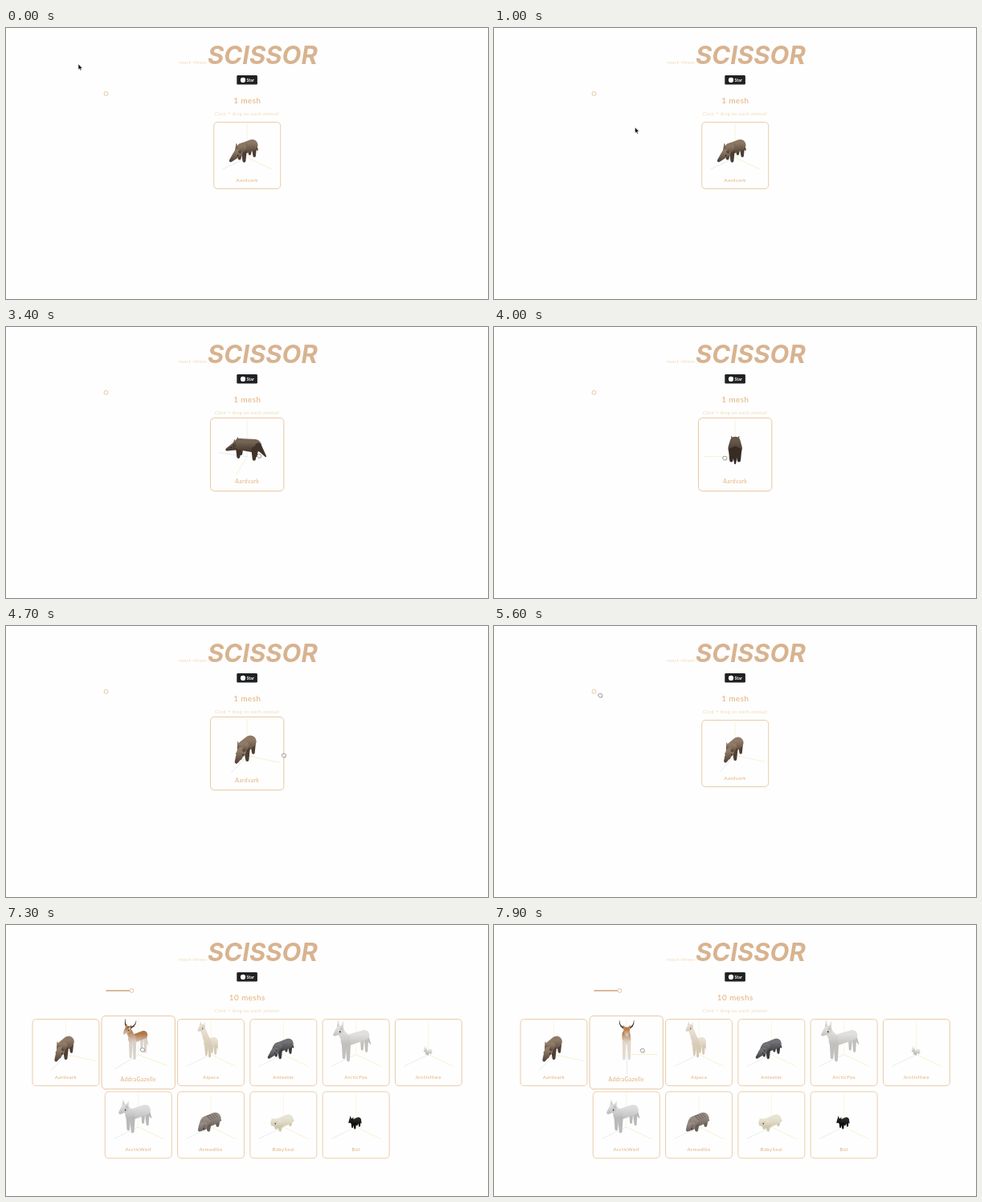
These frames come from a looping animation (600x338 px, 8000 ms). An HTML page:

```html
<!DOCTYPE html>
<html lang="en">
<head>
<meta charset="utf-8">
<title>Scissor</title>
<style>
html, body { margin: 0; height: 100%; overflow: hidden; background: #fefefe; }
svg { display: block; width: 100vw; height: 100vh; }
text { font-family: Lato, "Open Sans", sans-serif; fill: #e2b079; }
.mid { text-anchor: middle; }
.pale { fill: #f0dab6; }
.title { font: italic 700 31px Inter, sans-serif; fill: #d8b390; }
</style>
</head>
<body>
<svg viewBox="0 0 600 338">
  <defs id="defs"></defs>
  <text class="pale" x="215" y="45" font-size="6.4" letter-spacing=".25">react-three-</text>
  <text class="title" x="251" y="45">SCISSOR</text>
  <rect x="287.3" y="59" width="25.6" height="11.6" rx="1.4" fill="#1f2123"/>
  <circle cx="295" cy="64.9" r="3.1" fill="#fff"/>
  <text x="299.6" y="67" font-size="5.2" style="font-weight:700;fill:#fff">Star</text>
  <text id="count" class="mid" x="300.3" y="93.6" font-size="9.8" letter-spacing=".5"></text>
  <text class="mid pale" x="300.3" y="108.6" font-size="6" letter-spacing=".25">Click + drag on each animal!</text>
  <g id="scene"></g>
</svg>
<script>
const LOOP = 8000, RAD = Math.PI / 180;
const SIN = .48, COS = .88; // camera elevation
const SIDES = [-1, 1], STEPS = [0, 1, 2, 3];
const $ = id => document.getElementById(id);
const clamp = (v, lo, hi) => Math.min(hi, Math.max(lo, v));

// Points are [forward, side, up]; a part is a tapered capsule between two of them.
const part = (a, ra, b, rb, fill) => ({ a, ra, b, rb, fill });

// Every animal grows from its body length, height and girth, neck rise, nose and ear length.
function beast(name, light, dark, len, tall, girth, neck, nose, ear, extra = []) {
  const hr = girth * .65, hf = len + girth * .8 + neck * .2, hy = tall + neck;
  const parts = [
    part([-len, 0, tall], girth, [len, 0, tall], girth * .9),
    part([len, 0, tall + girth * .2], girth * .75, [hf, 0, hy], hr * .8),
    part([hf, 0, hy], hr, [hf + nose, 0, hy - nose * .55], hr * .35),
    part([-len - girth * .5, 0, tall], girth * .5, [-len * 1.5 - girth, 0, tall * .25], girth * .1, dark)
  ];
  for (const s of SIDES) {
    for (const f of [-len, len])
      parts.push(part([f, s * girth * .5, tall - girth * .4], girth * .42, [f, s * girth * .55, .5], girth * .24, dark));
    parts.push(part([hf, s * hr * .6, hy + hr * .5], hr * .4, [hf - 1, s * hr, hy + hr * .6 + ear], hr * .1));
    const eye = [hf + nose * .35, s * hr * .75, hy - nose * .1];
    parts.push(part(eye, hr * .16, eye, hr * .16, '#28221f'));
  }
  return { name, light, dark, parts: parts.concat(extra) };
}

const horn = (s, u) => [17 - 4 * u, s * (1 + 6.5 * Math.sin(u * Math.PI / 2)), 39 + 8 * u * u];
const horns = SIDES.flatMap(s => STEPS.map(k =>
  part(horn(s, k / 4), 1 - k / 5, horn(s, (k + 1) / 4), .8 - k / 5, '#4a3c34')));
const bands = SIDES.flatMap(s => STEPS.map(k =>
  part([k * 4 - 6, s * 5.5, 14], .35, [k * 4 - 6, 0, 17.4], .35, '#6b625c')));

const herd = [
  beast('Aardvark', '#917c68', '#4f3f34', 9, 15, 7.4, -3, 11, 7),
  beast('AddraGazelle', '#b67c49', '#e0d8d0', 10, 23, 5, 14, 6, 3, horns),
  beast('Alpaca', '#f3eadb', '#e0d2bd', 5, 17, 5.6, 24, 5, 4),
  beast('Anteater', '#77777a', '#3f3f43', 9, 13, 6.5, -3, 9, 2),
  beast('ArcticFox', '#ebeae8', '#cbc9c6', 16, 24, 7, 16, 7, 8),
  beast('ArcticHare', '#ececea', '#c4c2c0', 2.5, 4, 2.6, 4, 2, 4),
  beast('ArcticWolf', '#e6e6e6', '#c2c2c2', 13, 21, 7, 11, 7, 6),
  beast('Armadillo', '#9d928a', '#6d635c', 8, 10, 7.5, -4, 5, 3, bands),
  beast('BabySeal', '#f2eddc', '#d8d0b6', 9, 8, 6.5, 4, 3, 0),
  beast('Bat', '#2a2a2a', '#0c0c0c', 4, 8, 4, 4, 3, 3)
];

$('defs').innerHTML = herd.map((b, i) =>
  `<linearGradient id="fur${i}" x2="0" y2="1"><stop offset=".25" stop-color="${b.light}"/><stop offset="1" stop-color="${b.dark}"/></linearGradient>`).join('');

function project([f, s, y], turn) {
  const c = Math.cos(turn * RAD), n = Math.sin(turn * RAD);
  const d = f * n - s * c, p = 1 + d * .008;
  return { x: (f * c + s * n) * p, y: 2.5 + (d * SIN - y * COS) * p, p, near: d * COS + y * SIN };
}

function capsule(a, ra, b, rb, fill) {
  const dx = b.x - a.x, dy = b.y - a.y, d = Math.hypot(dx, dy);
  if (d <= Math.abs(ra - rb) + .01) {
    const big = ra > rb ? a : b;
    return `<circle cx="${big.x}" cy="${big.y}" r="${Math.max(ra, rb)}" fill="${fill}"/>`;
  }
  const dir = Math.atan2(dy, dx), w = Math.acos((ra - rb) / d), wide = w > Math.PI / 2 ? 1 : 0;
  const pt = (o, r, k) => `${(o.x + r * Math.cos(dir + k)).toFixed(2)} ${(o.y + r * Math.sin(dir + k)).toFixed(2)}`;
  return `<path fill="${fill}" d="M${pt(a, ra, w)}A${ra} ${ra} 0 ${1 - wide} 1 ${pt(a, ra, -w)}L${pt(b, rb, -w)}A${rb} ${rb} 0 ${wide} 1 ${pt(b, rb, w)}Z"/>`;
}

function axis(end, color, turn) {
  const o = project([0, 0, 0], turn), e = project(end, turn);
  return `<path d="M${o.x} ${o.y}L${e.x} ${e.y}" stroke="${color}" stroke-width=".6"/>`;
}

function body(i, turn) {
  return herd[i].parts.map(({ a, ra, b, rb, fill = `url(#fur${i})` }) => {
    const p = project(a, turn), q = project(b, turn);
    return { near: p.near + q.near, svg: capsule(p, ra * p.p, q, rb * q.p, fill) };
  }).sort((p, q) => p.near - q.near).map(o => o.svg).join('');
}

// Cursor stops: [time, x, y], straight moves between them.
const stops = [
  [0, 90, 45], [1000, 175.5, 124], [1200, 175.5, 124], [1400, 515, 85], [1800, 515, 85],
  [2100, 598, 150], [2600, 343, 159], [2900, 338, 159], [4000, 287, 164], [4150, 284, 164],
  [4700, 346, 162], [5400, 132, 87], [5650, 132, 87], [6250, 158, 85], [6700, 168, 126],
  [7200, 167, 156], [7900, 184.5, 157]
];
function cursor(t) {
  const i = stops.findIndex(s => s[0] > t);
  const [t1, x1, y1] = stops.at(i < 0 ? -1 : i), [t0, x0, y0] = stops.at(i < 0 ? -1 : i - 1);
  const u = t1 > t0 ? (t - t0) / (t1 - t0) : 0;
  return [x0 + (x1 - x0) * u, y0 + (y1 - y0) * u];
}

// Dragging turns an animal with the cursor; its card is enlarged meanwhile.
const drags = [[2900, 4700], [7200, LOOP]];
function pose(i, t) {
  if (!drags[i]) return [135, 1];
  const [from, to] = drags[i];
  const moved = cursor(clamp(t, from, to))[0] - cursor(from)[0];
  const grown = clamp(Math.min(t - from + 200, to + 200 - t) / 200, 0, 1);
  return [135 - 2.65 * moved, 1 + .1 * grown];
}

function card(i, n, t) {
  const [turn, scale] = pose(i, t);
  const row = i < 6 ? 0 : 1, inRow = row ? n - 6 : Math.min(n, 6);
  const x = 300.2 + (i - row * 6 - (inRow - 1) / 2) * 90.3, y = 159 + row * 90.4;
  return `<g transform="translate(${x} ${y}) scale(${scale})">
    <rect x="-41.5" y="-41.5" width="83" height="83" rx="4.5" fill="#fefefe" stroke="#e4c096" stroke-width=".8"/>
    ${axis([0, 0, 47], '#f5eecb', turn)}${axis([0, 36, 0], '#f5e8b4', turn)}${axis([36, 0, 0], '#d0e4ea', turn)}
    <g style="filter:brightness(${.85 + .15 * Math.sin(turn * RAD)})">${body(i, turn)}</g>
    <text class="mid" y="33" font-size="6.2" letter-spacing=".35">${herd[i].name}</text></g>`;
}

const arrow = '<path d="M0 0v7l1.6-1.5 1.1 2.5 1.2-.5-1.1-2.4h2.3z" fill="#111" stroke="#fff" stroke-width=".4"/>';
const hand = '<path d="M-2.3-.2q-.5-1.2.6-1.3 0-1.3 1.1-1 .7-.8 1.4 0 1-.4 1.2.6 1 0 .8 1.4l-.5 2.4h-3z" fill="#fff" stroke="#555" stroke-width=".6"/>';
const edge = '<path d="M591 8V328.6H8" fill="none" stroke="#cfc8bc" stroke-width="1.5"/>';

function slider(n) {
  const x = 124.5 + (n - 1) * 3.55;
  return `<path d="M124.5 81.8H${x}" stroke="#d8b18d" stroke-width="1.8"/>
    <circle cx="${x}" cy="81.8" r="2.5" fill="#fefefe" stroke="#dfb88c" stroke-width=".8"/>`;
}

function draw(t) {
  const n = 1 + Math.floor(clamp((t - 5650) / 60, 0, 9));
  $('count').textContent = n + (n > 1 ? ' meshs' : ' mesh');
  const cards = herd.slice(0, n).map((_, i) => card(i, n, t)).join('');
  $('scene').innerHTML = slider(n) + cards + (t >= 2100 && t < 2900 ? edge : '') +
    `<g transform="translate(${cursor(t)})">${t < 2500 ? arrow : hand}</g>`;
}

function tick(now) {
  draw(now % LOOP);
  requestAnimationFrame(tick);
}
draw(0);
requestAnimationFrame(tick);
</script>
</body>
</html>
```
